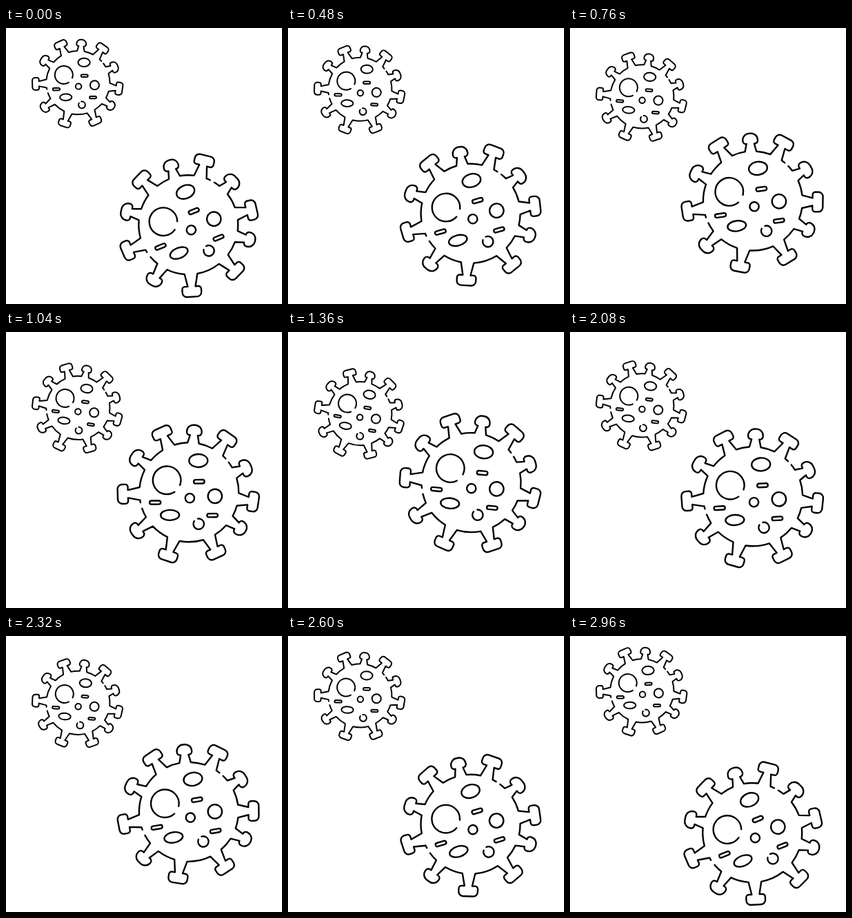
These frames come from a looping animation (400 px wide and 400 px high, 3 s). An HTML page with a canvas:

```html
<!DOCTYPE html>
<html lang="en">
<head>
<meta charset="utf-8">
<title>Floating viruses</title>
<style>
  html, body { margin: 0; width: 100%; height: 100%; overflow: hidden; background: #fff; }
  canvas { display: block; width: 400px; height: 400px; }
</style>
</head>
<body>
<canvas id="stage"></canvas>
<script>
const PERIOD = 3000, PEAK = 1520, RADIUS = 72;
const canvas = document.getElementById('stage');
const ctx = canvas.getContext('2d');
const ratio = Math.max(1, window.devicePixelRatio || 1);
canvas.width = canvas.height = 400 * ratio;

const rad = deg => deg * Math.PI / 180;
const mix = (a, b, k) => a + (b - a) * k;

// Spikes: angle, distance of the head, half width of the head
const spikes = [
  [179, 96, 14], [214, 92, 12.3], [246, 95, 14.3], [275.5, 90.3, 10.8],
  [306, 96, 14.3], [337.3, 90, 12.2], [368.9, 94, 14.3], [395.7, 92, 10.5],
  [426.5, 96, 14], [469, 97, 13.8], [504, 95, 11.8]
];
// Breaks in the body outline, keyed by the spike that precedes them
const breaks = { 4: [318, 323.5], 10: [521.5, 528.5] };

const isBig = half => half > 13;
const baseOf = half => isBig(half) ? 9.3 : 8.3;
const spreadOf = half => Math.asin(baseOf(half) / RADIUS);

function spike(angle, dist, half) {
  const inner = dist - 7.5, outer = dist + 7.5;
  const neck = 5.6, base = baseOf(half);
  const [tight, loose] = isBig(half) ? [4, 6.5] : [4.5, 9.5];
  const foot = Math.sqrt(RADIUS * RADIUS - base * base);
  ctx.save();
  ctx.rotate(rad(angle));
  ctx.lineTo(foot, -base);
  ctx.lineTo(inner, -neck);
  ctx.arcTo(inner, -half, outer, -half, tight);
  ctx.arcTo(outer, -half, outer, half, loose);
  ctx.arcTo(outer, half, inner, half, loose);
  ctx.arcTo(inner, half, inner, neck, tight);
  ctx.lineTo(inner, neck);
  ctx.lineTo(foot, base);
  ctx.restore();
}

function body() {
  ctx.beginPath();
  spikes.forEach(([angle, dist, half], i) => {
    spike(angle, dist, half);
    const last = i === spikes.length - 1;
    const [nextAngle, , nextHalf] = spikes[last ? 0 : i + 1];
    const from = rad(angle) + spreadOf(half);
    const to = rad(nextAngle + (last ? 360 : 0)) - spreadOf(nextHalf);
    const gap = breaks[i];
    if (!gap) return ctx.arc(0, 0, RADIUS, from, to);
    const resume = rad(gap[1]);
    ctx.arc(0, 0, RADIUS, from, rad(gap[0]));
    ctx.moveTo(RADIUS * Math.cos(resume), RADIUS * Math.sin(resume));
    ctx.arc(0, 0, RADIUS, resume, to);
  });
  ctx.stroke();
}

function oval(x, y, rx, ry = rx, from = 0, to = 360) {
  ctx.beginPath();
  ctx.ellipse(x, y, rx, ry, 0, rad(from), rad(to));
  ctx.stroke();
}

function capsule(x, y, w, h) {
  ctx.beginPath();
  ctx.roundRect(x - w / 2, y - h / 2, w, h, h / 2);
  ctx.stroke();
}

function virus(x, y, scale, angle, line, ring) {
  ctx.save();
  ctx.translate(x, y);
  ctx.rotate(rad(angle));
  ctx.scale(scale, scale);
  ctx.lineWidth = line / scale;
  body();
  oval(-32, -17.8, 20.3, 20.3, 57, 381);
  oval(14, -45.7, 13.5, 9.5);
  oval(-28, 32.8, 13.5, 7.5);
  oval(37.5, 6, 10.2);
  oval(1, 8.5, 6.6);
  oval(ring[0], ring[1], 7.7, 7.7, 261, 574);
  capsule(14.7, -15.3, 15.5, 5.5);
  capsule(-49.3, 14.3, 16, 5.2);
  capsule(33.5, 33.8, 15.5, 5.2);
  ctx.restore();
}

function draw(now) {
  const t = now % PERIOD;
  const p = t < PEAK ? t / PEAK : (PERIOD - t) / (PERIOD - PEAK);
  const k = p * p * (3 - 2 * p);
  ctx.setTransform(ratio, 0, 0, ratio, 0, 0);
  ctx.fillStyle = '#fff';
  ctx.fillRect(0, 0, 400, 400);
  ctx.strokeStyle = '#000';
  ctx.lineJoin = ctx.lineCap = 'round';
  virus(104.4, mix(79.2, 119.4, k), 0.64, mix(-0.6, 9.8, k), 2, [8.2, 50.5]);
  virus(mix(264.3, 265.6, k), mix(285.2, 216, k), 1, mix(-22, 6, k), 2.4, [13.5, 46]);
}

const start = performance.now();
function tick() {
  draw(performance.now() - start);
  requestAnimationFrame(tick);
}
tick();
</script>
</body>
</html>
```
